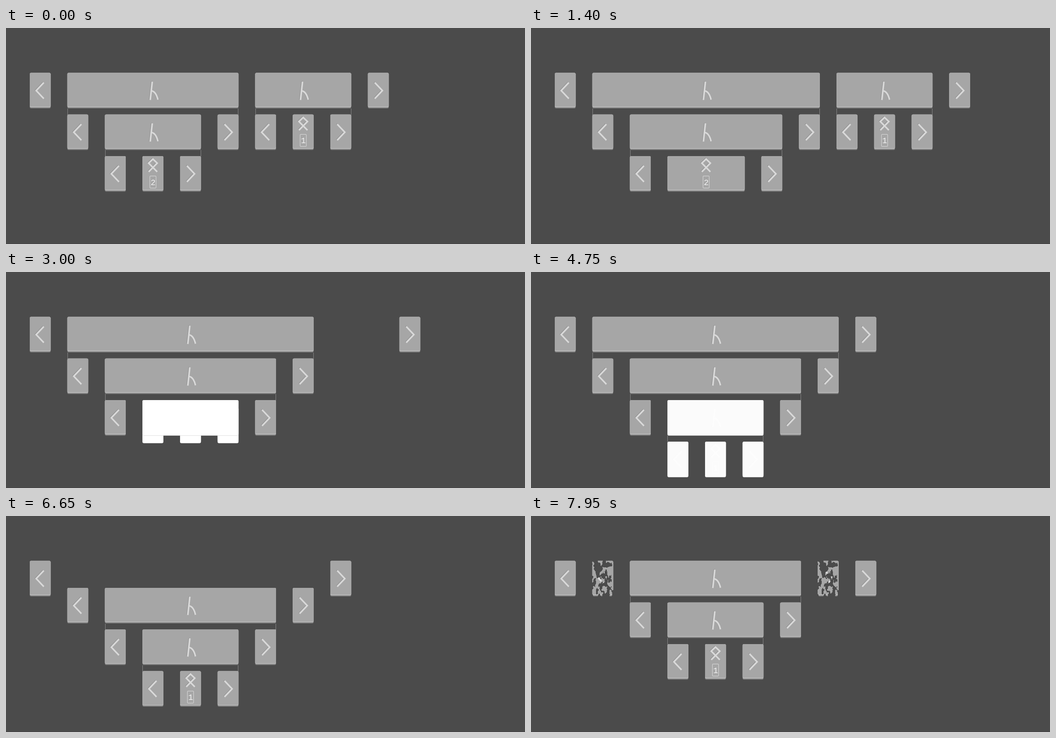
Write an HTML page with a canvas that moves like this. It is 1157 px wide and 484 px high and loops after 8 s.

```html
<!DOCTYPE html>
<html lang="en">
<head>
<meta charset="utf-8">
<title>Reduction steps</title>
<style>
html, body { margin: 0; width: 100%; height: 100%; overflow: hidden; background: #4b4b4b; }
canvas { display: block; }
</style>
</head>
<body>
<canvas id="stage" width="1157" height="484"></canvas>
<script>
const W = 1157, H = 484, LOOP = 8000, STEP = 50;
const CARD_W = 46.5, CARD_H = 79.5, COL = 83.75, ROW = 93.25;
const stage = document.getElementById('stage').getContext('2d');
const layerCanvas = document.createElement('canvas');
layerCanvas.width = W;
layerCanvas.height = H;
const layer = layerCanvas.getContext('2d', { willReadFrequently: true });

const colX = n => 53 + COL * n;
const rowY = n => 100.5 + ROW * n;
const spanW = n => CARD_W + COL * n;
const ramp = (t, from, to) => Math.min(1, Math.max(0, (t - from) / (to - from)));

// Glyph outlines, relative to the card centre
const glyphs = {
  open: new Path2D('M8 -18 L-9 0 L8 18'),
  close: new Path2D('M-8 -18 L9 0 L-8 18'),
  lambda: new Path2D('M-1.5 -20 L-6 21 M-4.5 0 C3 1 8.5 9 11 20.5'),
  name: new Path2D('M-9.5 -4.5 L9.5 -24 L0 -33 L-9.5 -24 L9.5 -4.5')
};

function hash(x, y, seed) {
  const v = Math.sin(x * 127.1 + y * 311.7 + seed * 74.7) * 43758.5453;
  return v - Math.floor(v);
}

function noise(x, y, seed) {
  const ix = Math.floor(x), iy = Math.floor(y);
  const ease = f => f * f * (3 - 2 * f);
  const fx = ease(x - ix), fy = ease(y - iy);
  const mix = (a, b, f) => a + (b - a) * f;
  return mix(
    mix(hash(ix, iy, seed), hash(ix + 1, iy, seed), fx),
    mix(hash(ix, iy + 1, seed), hash(ix + 1, iy + 1, seed), fx), fy);
}

// Moment, from 0 to 1, at which a point of a card vanishes
function lifeAt(u, v) {
  const n = 0.75 * noise(u * 9, v * 9, 1) + 0.25 * noise(u * 24, v * 22, 2) - 0.5;
  const corner = 0.28 * Math.exp(-(((u - 0.07) / 0.045) ** 2) - ((v - 0.96) / 0.11) ** 2);
  return 0.56 + n * (n > 0 ? 0.38 : 1.2) + corner;
}

function fillCard(c, x, y, w, h) {
  c.beginPath();
  c.roundRect(x, y, w, h, 3);
  c.fill();
}

function strokeGlyph(c, path, color, width, dx, dy) {
  c.save();
  c.translate(dx, dy);
  c.strokeStyle = color;
  c.lineWidth = width;
  c.stroke(path);
  c.restore();
}

function paintCard(c, kind, x, y, w, index, white) {
  c.fillStyle = '#858585';
  fillCard(c, x, y, w, CARD_H);
  c.fillStyle = '#c9c9c9';
  fillCard(c, x, y, w, CARD_H - 2.5);
  c.fillStyle = '#a6a6a6';
  fillCard(c, x, y, w, CARD_H - 3.7);

  c.save();
  c.translate(x + w / 2, y + 39.7);
  strokeGlyph(c, glyphs[kind], '#8f8f8f', 3.6, -1, -0.7);
  strokeGlyph(c, glyphs[kind], '#d9d9d9', 3.6, 0, 0);
  if (index) {
    c.strokeStyle = '#d4d4d4';
    c.lineWidth = 1.2;
    c.beginPath();
    c.roundRect(-6.8, 5, 13.8, 27, 1.5);
    c.stroke();
    c.fillStyle = '#f4f4f4';
    c.font = '18px "Liberation Mono", monospace';
    c.textAlign = 'center';
    c.fillText(index, 0.3, 25);
  }
  c.restore();

  if (white > 0) {
    c.globalAlpha = white;
    c.fillStyle = '#fff';
    fillCard(c, x, y, w, CARD_H);
    c.globalAlpha = 1;
  }
}

function card(kind, x, y, { w = CARD_W, index = '', white = 0, gone = 0 } = {}) {
  if (gone >= 1) return;
  if (gone <= 0) {
    paintCard(stage, kind, x, y, w, index, white);
    return;
  }
  const left = Math.floor(x), top = Math.floor(y);
  const pw = Math.ceil(w) + 1, ph = Math.ceil(CARD_H) + 1;
  layer.clearRect(0, 0, W, H);
  paintCard(layer, kind, x, y, w, index, white);
  const image = layer.getImageData(left, top, pw, ph);
  for (let j = 0; j < ph; j++) {
    for (let i = 0; i < pw; i++) {
      if (lifeAt(i / w, j / CARD_H) < gone) image.data[(j * pw + i) * 4 + 3] = 0;
    }
  }
  layer.putImageData(image, left, top);
  stage.drawImage(layerCanvas, left, top, pw, ph, left, top, pw, ph);
}

function links(x, w, from, to) {
  if (to - from < 1) return;
  stage.fillStyle = '#c4c4c4';
  for (let y = Math.ceil(from); y < to; y += 2) {
    stage.fillRect(Math.round(x), y, 1, 1);
    stage.fillRect(Math.round(x + w) - 1, y, 1, 1);
  }
}

function brackets(x, w, y, look) {
  card('open', x, y, look);
  card('close', x + w - CARD_W, y, look);
}

function abstraction(x, w, y, look) {
  card('lambda', x, y, { ...look, w });
}

function draw(t) {
  const grow = 2 * COL * ramp(t, 800, 1600);
  const shut = 3 * COL * ramp(t, 2630, 3585);
  const drop = ROW * ramp(t, 2825, 3780);
  const lift = ROW * ramp(t, 6300, 7300);
  const eaten = ramp(t, 1650, 2450);
  const opened = ramp(t, 5500, 6300);
  const peeled = ramp(t, 7500, 8300);
  const white = ramp(t, 1650, 2550) * (1 - ramp(t, 4740, 4950));

  stage.fillStyle = '#4b4b4b';
  stage.fillRect(0, 0, W, H);
  stage.fillStyle = '#434143';
  stage.fillRect(0, H - 1, W, 1);

  const y1 = rowY(1) - lift, y2 = rowY(2) - lift;
  const outerW = spanW(4) + grow, innerW = spanW(2) + grow, slotW = CARD_W + grow;

  brackets(colX(0), spanW(9) + grow - shut, rowY(0));

  if (t < 5350) links(colX(1), outerW, rowY(0) + CARD_H + 0.5, rowY(1));
  abstraction(colX(1), outerW, rowY(0), { gone: opened });
  brackets(colX(1), outerW, y1, { gone: peeled });

  links(colX(2), innerW, y1 + CARD_H + 0.5, y2);
  abstraction(colX(2), innerW, y1);
  brackets(colX(2), innerW, y2);

  if (t < 2550) {
    card('name', colX(3), y2, { w: slotW, index: '2', white });
  } else {
    const y3 = y2 + drop;
    links(colX(3), slotW, y2 + CARD_H + 0.5, y3);
    brackets(colX(3), slotW, y3, { white });
    card('name', colX(4), y3, { index: '1', white });
    abstraction(colX(3), slotW, y2, { white });
  }

  const argX = colX(6) + grow, argW = spanW(2);
  if (eaten === 0) links(argX, argW, rowY(0) + CARD_H + 0.5, rowY(1));
  abstraction(argX, argW, rowY(0), { gone: eaten });
  brackets(argX, argW, rowY(1), { gone: eaten });
  card('name', argX + COL, rowY(1), { index: '1', gone: eaten });
}

function tick() {
  const t = performance.now() % LOOP;
  draw(Math.floor(t / STEP) * STEP);
  requestAnimationFrame(tick);
}
tick();
</script>
</body>
</html>
```
